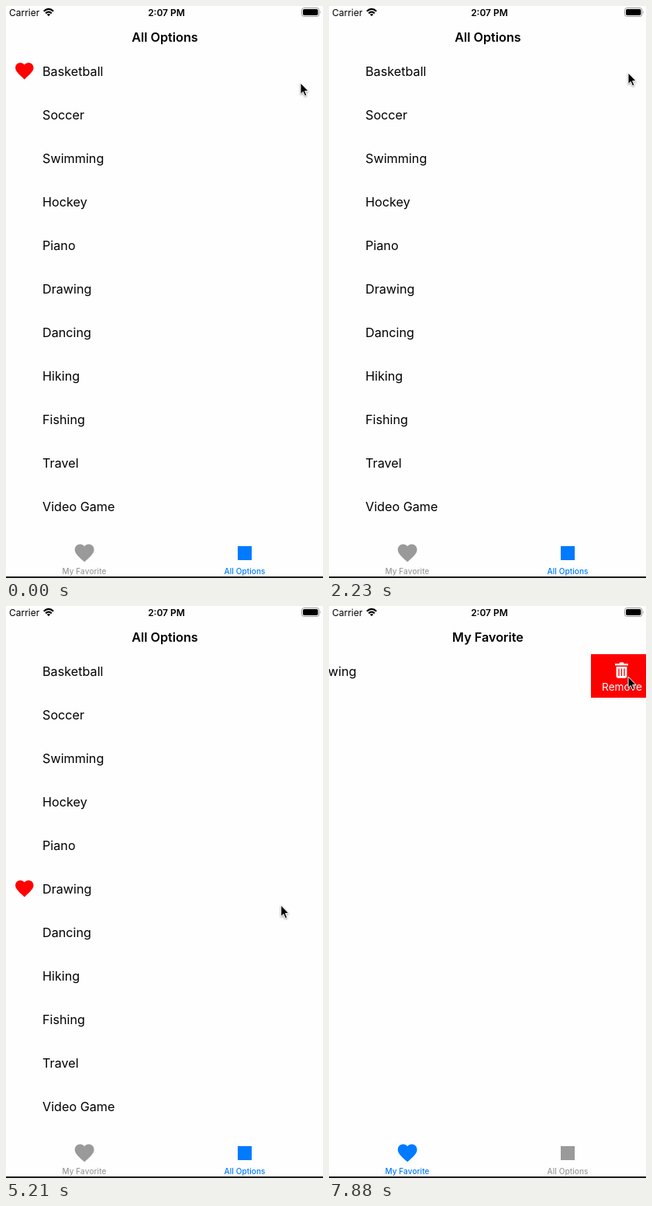
These frames come from a looping animation (409 px wide and 736 px high, 8 s). An HTML page:

```html
<!DOCTYPE html>
<html lang="en">
<head>
<meta charset="utf-8">
<title>Favorites list</title>
<style>
  html, body { margin: 0; height: 100%; overflow: hidden; background: #fefefe; }
  svg { display: block; width: 409px; height: 736px; background: #fefefe; }
  text { font: 16.2px Inter, "Open Sans", sans-serif; }
  .mid { text-anchor: middle; }
  #title { font-weight: 600; }
  .status { font-size: 12px; }
  .clock { font-weight: 600; }
  .tab text { font-size: 10px; font-weight: 500; letter-spacing: .1px; }
  .tab { fill: #9a9a9a; }
  .tab.on { fill: #007aff; }
  #label { font-size: 13.7px; }
  #cursor { filter: drop-shadow(0 1px 1px #0006); }
</style>
</head>
<body>
<svg viewBox="0 0 409 736">
  <defs>
    <path id="heart" transform="translate(-12 -12.2)" d="M12 21.35l-1.45-1.32C5.4 15.36 2 12.28 2 8.5 2 5.42 4.42 3 7.5 3c1.74 0 3.41.81 4.5 2.09C13.09 3.81 14.76 3 16.5 3 19.58 3 22 5.42 22 8.5c0 3.78-3.4 6.86-8.55 11.54z"/>
  </defs>

  <text class="status" x="4" y="12.7">Carrier</text>
  <path d="M48.8 6.7Q55 1 61.2 6.7M51.2 9.4Q55 5.8 58.8 9.4" fill="none" stroke="#000" stroke-width="2.2"/>
  <path d="M55 13.2l-2.2-2.4q2.2-1.8 4.4 0z"/>
  <text class="status clock mid" x="207" y="12.7">2:07 PM</text>
  <rect x="381.5" y="2.5" width="22.5" height="11" rx="3" fill="none" stroke="#999"/>
  <rect x="383" y="4" width="19.5" height="8" rx="1.8"/>
  <path d="M405.2 6.2q1.6 1.8 0 3.6z" fill="#999"/>
  <text id="title" class="mid" x="205" y="46"></text>

  <g id="rows"></g>

  <g id="action">
    <rect id="gap" height="56" fill="#dcdcdc"/>
    <g id="button">
      <rect id="plate" width="90" height="56"/>
      <g fill="#fff">
        <use id="mark" href="#heart" x="40" y="20"/>
        <g id="bin">
          <path d="M31 12.3h5.3l1-1.8h4.4l1 1.8h5.3v2.2H31zM32.6 16h13.8v12.4q0 2.4-2.4 2.4h-9q-2.4 0-2.4-2.4z"/>
          <path d="M36 18.5v9.5M39.5 18.5v9.5M43 18.5v9.5" stroke="#f00" stroke-width="1.3"/>
        </g>
        <text id="label" class="mid" x="40" y="47"></text>
      </g>
    </g>
  </g>

  <g class="tab" id="favTab">
    <use href="#heart" transform="translate(101.2 704) scale(1.24)"/>
    <text class="mid" x="101" y="730.7">My Favorite</text>
  </g>
  <g class="tab" id="allTab">
    <rect x="299" y="695" width="18" height="18"/>
    <text class="mid" x="308" y="730.7">All Options</text>
  </g>
  <rect y="734" width="409" height="2" fill="#1c1c1e"/>

  <path id="cursor" d="M0 0V14.4L3.3 11.4 5.6 16.8 8 15.8 5.7 10.5H10.2Z" stroke="#fff" stroke-linejoin="round"/>
</svg>

<script>
const LOOP = 8000, STEP = 148.5;   // the screen refreshes once per STEP ms
const NAMES = ['Basketball', 'Soccer', 'Swimming', 'Hockey', 'Piano', 'Drawing',
  'Dancing', 'Hiking', 'Fishing', 'Travel', 'Video Game'];
const DRAWING = NAMES.indexOf('Drawing');
const EDGE = 413, REST = 75, TAB_SWITCH = 42;

// A glide eases the pointer to (x, y) between two steps, bowed sideways halfway.
const glide = (from, to, x, y, bowX = 0, bowY = 0) => ({ from, to, x, y, bowX, bowY });
const GLIDES = [
  glide(2, 10, 298, 89, 0, 27),
  glide(10, 15, 386, 86),
  glide(16, 24, 384, 347, -231, 410),
  glide(24, 26, 374, 360),
  glide(27, 31, 363, 363, -80),
  glide(31, 34, 370, 366),
  glide(34, 41, 95, 711),
  glide(41, 42, 110, 666),
  glide(42, 47, 372, 92),
  glide(47, 53, 386, 91, -90)
];
const SWIPES = [
  { open: 7, close: 13, over: 0 },
  { open: 28, close: 32, over: 24 },
  { open: 47, close: 99, over: 24 }
];

const $ = id => document.getElementById(id);
const set = (el, attrs) => { for (const k in attrs) el.setAttribute(k, attrs[k]); };
const show = (el, on) => set(el, { visibility: on ? 'visible' : 'hidden' });
const move = (el, x, y) => set(el, { transform: `translate(${x} ${y})` });
const rowTop = i => 62 + 56 * i;
const progress = (n, from, to) => Math.min(1, Math.max(0, (n - from) / (to - from)));
const smooth = u => u * u * (3 - 2 * u);
const bump = u => Math.sin(Math.PI * u);

function pointer(n) {
  let x = 380, y = 99;
  for (const g of GLIDES) {
    const u = progress(n, g.from, g.to), e = smooth(u);
    x += (g.x - x) * e + g.bowX * bump(u);
    y += (g.y - y) * e + g.bowY * bump(u);
  }
  return [x, y];
}

function swipe(n) {
  const shift = SWIPES.reduce((sum, s) => {
    const u = progress(n, s.open, s.open + 4);
    const opened = REST * Math.sin(u * Math.PI / 2) + s.over * bump(u);
    return sum + opened * (1 - smooth(progress(n, s.close, s.close + 2)));
  }, 0);
  return Math.round(shift);
}

function draw(n) {
  const favorites = n >= TAB_SWITCH;
  const active = n < 16 ? 0 : DRAWING;
  const liked = n < 14 ? 0 : n >= 33 ? DRAWING : -1;
  const shift = swipe(n);

  rows.forEach((row, i) => {
    const on = !favorites || i === DRAWING;
    move(row, i === active ? -shift : 0, rowTop(favorites ? 0 : i));
    show(row, on);
    show(row.children[0], on && i === liked);
  });

  const left = EDGE - shift, x = Math.max(left, EDGE - REST);
  const add = active === DRAWING && !favorites;
  show($('action'), shift > 0);
  move($('action'), 0, rowTop(favorites ? 0 : active));
  set($('gap'), { x: left, width: x - left });
  move($('button'), x, 0);
  set($('plate'), { fill: add ? '#00cc00' : '#ff0000' });
  $('label').textContent = add ? 'Add' : 'Remove';
  $('mark').style.display = favorites ? 'none' : '';
  $('bin').style.display = favorites ? '' : 'none';

  $('title').textContent = favorites ? 'My Favorite' : 'All Options';
  $('favTab').classList.toggle('on', favorites);
  $('allTab').classList.toggle('on', !favorites);
  move($('cursor'), ...pointer(n));
}

$('rows').innerHTML = NAMES.map(name => `<g>
  <use href="#heart" transform="translate(23.8 21.7) scale(1.17)" fill="#f00"/>
  <text x="47" y="28">${name}</text></g>`).join('');
const rows = [...$('rows').children];

const start = performance.now();
function tick(now) {
  draw(Math.floor(Math.max(0, now - start) % LOOP / STEP));
  requestAnimationFrame(tick);
}
draw(0);
requestAnimationFrame(tick);
</script>
</body>
</html>
```
